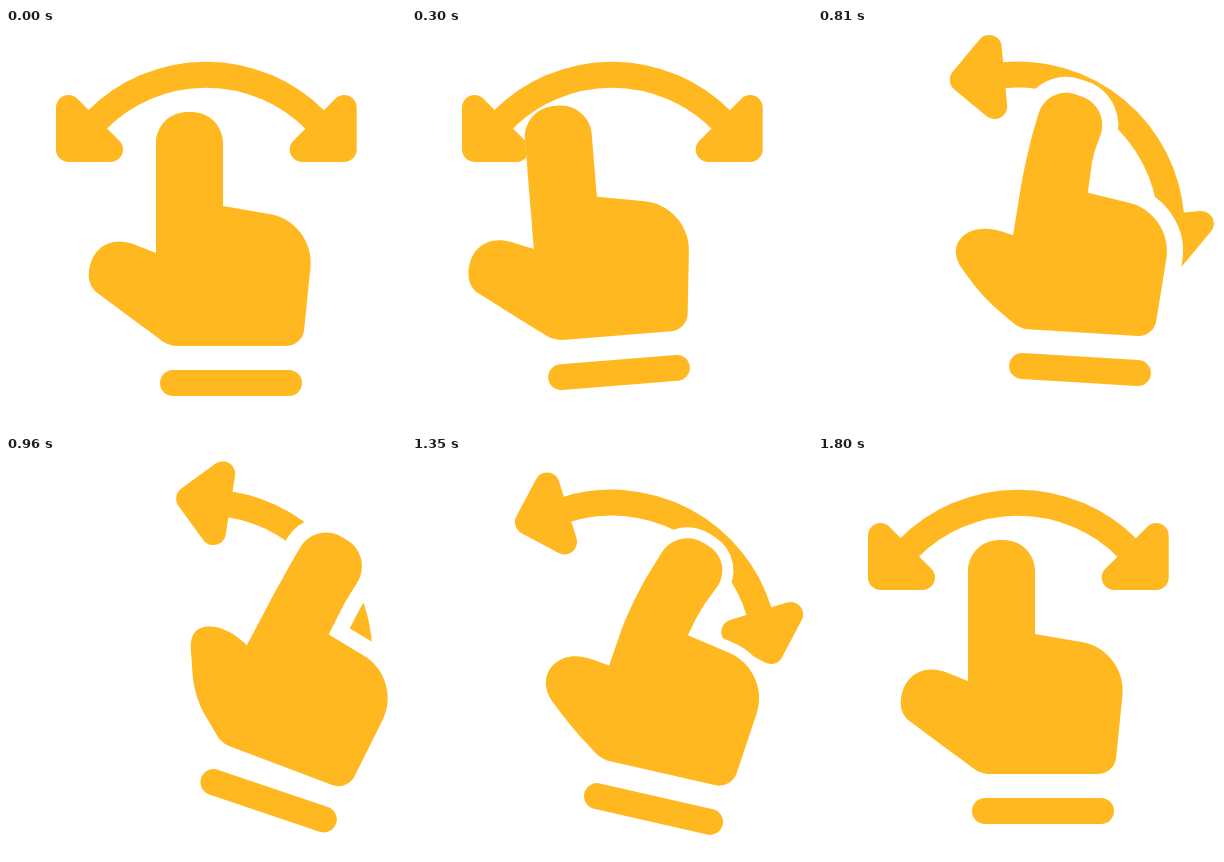
An HTML page that plays this animation: 400x400 px, repeating every 3.83 s.

```html
<!DOCTYPE html>
<html lang="en">
<head>
<meta charset="utf-8">
<title>Swipe gesture</title>
<style>
html, body { margin: 0; width: 100%; height: 100%; overflow: hidden; background: #fff; }
svg { display: block; width: 100%; height: 100%; }
</style>
</head>
<body>
<svg viewBox="0 0 400 400" fill="#ffb820" stroke="#ffb820" stroke-linejoin="round" stroke-linecap="round">
  <g id="arrows" stroke-width="25">
    <path d="M62.5 79.5V121.5H104.5Z"/>
    <path d="M338.2 79.5V121.5H296.2Z"/>
    <path d="M91.3 91.7A153.9 153.9 0 0 1 308.9 91.7" fill="none" stroke-width="26" stroke-linecap="butt"/>
  </g>
  <path id="gap" fill="#fff" stroke="#fff"/>
  <path id="hand" stroke="none"/>
  <path id="bar" stroke-width="26"/>
</svg>
<script>
const LOOP = 3830, STEP = 30;
const PIVOT = [225, 355];

// Hand outline at rest: x, y, corner size
const outline = [
  [150, 84, 31], [217, 84, 31], [217, 138, 12], [217, 178, 0],
  [309, 194, 45], [296.5, 318, 16], [163, 318, 8], [123, 288.5, 20],
  [82, 258, 11], [86, 200, 45], [150, 225, 0], [150, 150, 33]
];
const barEnds = [[167, 355], [283, 355]];
const points = [...outline, ...barEnds];
const TIP_L = 0, TIP_R = 1, SIDE_R = 2, KNUCKLE = 3, SHOULDER = 4, WRIST_R = 5, HEEL = 7,
      THUMB_LOW = 8, THUMB_TOP = 9, CROTCH = 10, SIDE_L = 11, BAR_L = 12, BAR_R = 13;

// Local shifts of outline points that bend finger and thumb
const leftBend = {
  [TIP_L]: [29, -16], [TIP_R]: [22, 16], [SIDE_R]: [2, 0], [SIDE_L]: [-5, -11],
  [HEEL]: [-29, -15], [THUMB_LOW]: [4, -3], [THUMB_TOP]: [10.5, 8.5]
};
const sweepBend = {
  [TIP_L]: [25, -12], [TIP_R]: [23.5, 7.6], [SIDE_R]: [8, 1], [SIDE_L]: [8, -5],
  [KNUCKLE]: [5, 0], [THUMB_LOW]: [11.5, -6], [THUMB_TOP]: [9, 11]
};
const rightBend = {
  [TIP_L]: [21, -3.5], [TIP_R]: [21.6, 5], [SIDE_R]: [15, 2], [SIDE_L]: [14, -17],
  [KNUCKLE]: [10, 1], [SHOULDER]: [3, 0], [WRIST_R]: [2.5, 0],
  [CROTCH]: [5.5, -20], [HEEL]: [-6, -13],
  [THUMB_LOW]: [16, -59], [THUMB_TOP]: [45, -22], [BAR_L]: [6, 6], [BAR_R]: [7, -5]
};
const returnBend = {
  [TIP_L]: [36, -10], [TIP_R]: [33, 13], [SIDE_R]: [10, 11], [SIDE_L]: [7, 10],
  [KNUCKLE]: [3, 0], [HEEL]: [0, 2], [THUMB_LOW]: [11, 6], [THUMB_TOP]: [1, 17]
};

// time, hand x, y, hand angle, arrow angle, gap around the hand
const pose = (t, x, y, angle, arrows, gap, bend = {}) => ({
  t, v: [x, y, angle, arrows, gap, ...points.flatMap((_, i) => bend[i] || [0, 0])]
});
const poses = [
  pose(0, ...PIVOT, 0, 0, 0),
  pose(300, 207, 344.5, -4.6, 0, 0),
  pose(480, 238.5, 342, -30, 0, 16, leftBend),
  pose(660, 238.5, 342, -30, 0, 16, leftBend),
  pose(810, 262, 341.5, 3.5, 39.7, 16, sweepBend),
  pose(1170, 254.6, 349.5, 33, 63.4, 16, rightBend),
  pose(1350, 241.5, 353, 12.8, 28, 11, returnBend),
  pose(1560, 215, 355, -6, -14, 0),
  pose(1800, ...PIVOT, 0, 0, 0)
];

// Slope at a pose: zero at turning points, harmonic mean elsewhere
function slope(k, i) {
  if (k === 0 || k === poses.length - 1) return 0;
  const [a, b, c] = poses.slice(k - 1, k + 2);
  const s = (b.v[i] - a.v[i]) / (b.t - a.t), r = (c.v[i] - b.v[i]) / (c.t - b.t);
  return s * r > 0 ? 2 * s * r / (s + r) : 0;
}

function stateAt(t) {
  const last = poses.length - 1;
  if (t >= poses[last].t) return poses[last].v;
  const k = poses.findIndex((p, i) => t < poses[i + 1].t);
  const a = poses[k], b = poses[k + 1], d = b.t - a.t, u = (t - a.t) / d;
  const w = u * u * (3 - 2 * u);
  return a.v.map((p, i) => p + (b.v[i] - p) * w
    + d * u * (1 - u) * ((1 - u) * slope(k, i) - u * slope(k + 1, i)));
}

const mix = (p, q, f) => [p[0] + (q[0] - p[0]) * f, p[1] + (q[1] - p[1]) * f];
const str = p => p.map(n => n.toFixed(2)).join(" ");

function roundedPath(pts) {
  const n = pts.length;
  const size = i => outline[i][2];
  const trim = (i, j) => {
    const len = Math.hypot(pts[i][0] - pts[j][0], pts[i][1] - pts[j][1]) || 1;
    return Math.min(size(i) / len, size(i) / (size(i) + size(j) || 1));
  };
  return pts.map((p, i) => {
    const prev = (i + n - 1) % n, next = (i + 1) % n;
    const from = mix(p, pts[prev], trim(i, prev)), to = mix(p, pts[next], trim(i, next));
    return (i ? "L" : "M") + str(from)
      + "C" + [mix(from, p, 0.55), mix(to, p, 0.55), to].map(str).join(" ");
  }).join("") + "Z";
}

const el = id => document.getElementById(id);
const arrows = el("arrows"), gap = el("gap"), hand = el("hand"), bar = el("bar");

function draw(t) {
  const [x, y, angle, turn, margin, ...shift] = stateAt(t);
  const c = Math.cos(angle * Math.PI / 180), s = Math.sin(angle * Math.PI / 180);
  const placed = points.map((p, i) => {
    const dx = p[0] + shift[2 * i] - PIVOT[0], dy = p[1] + shift[2 * i + 1] - PIVOT[1];
    return [x + dx * c - dy * s, y + dx * s + dy * c];
  });
  const shape = roundedPath(placed.slice(0, outline.length));
  arrows.setAttribute("transform", `rotate(${turn} 200 200)`);
  hand.setAttribute("d", shape);
  gap.setAttribute("d", shape);
  gap.setAttribute("stroke-width", Math.max(0, 2 * margin));
  bar.setAttribute("d", "M" + str(placed[BAR_L]) + "L" + str(placed[BAR_R]));
}

const start = performance.now();
function tick() {
  const t = (performance.now() - start) % LOOP;
  draw(Math.floor(t / STEP) * STEP);
  requestAnimationFrame(tick);
}
tick();
</script>
</body>
</html>
```
